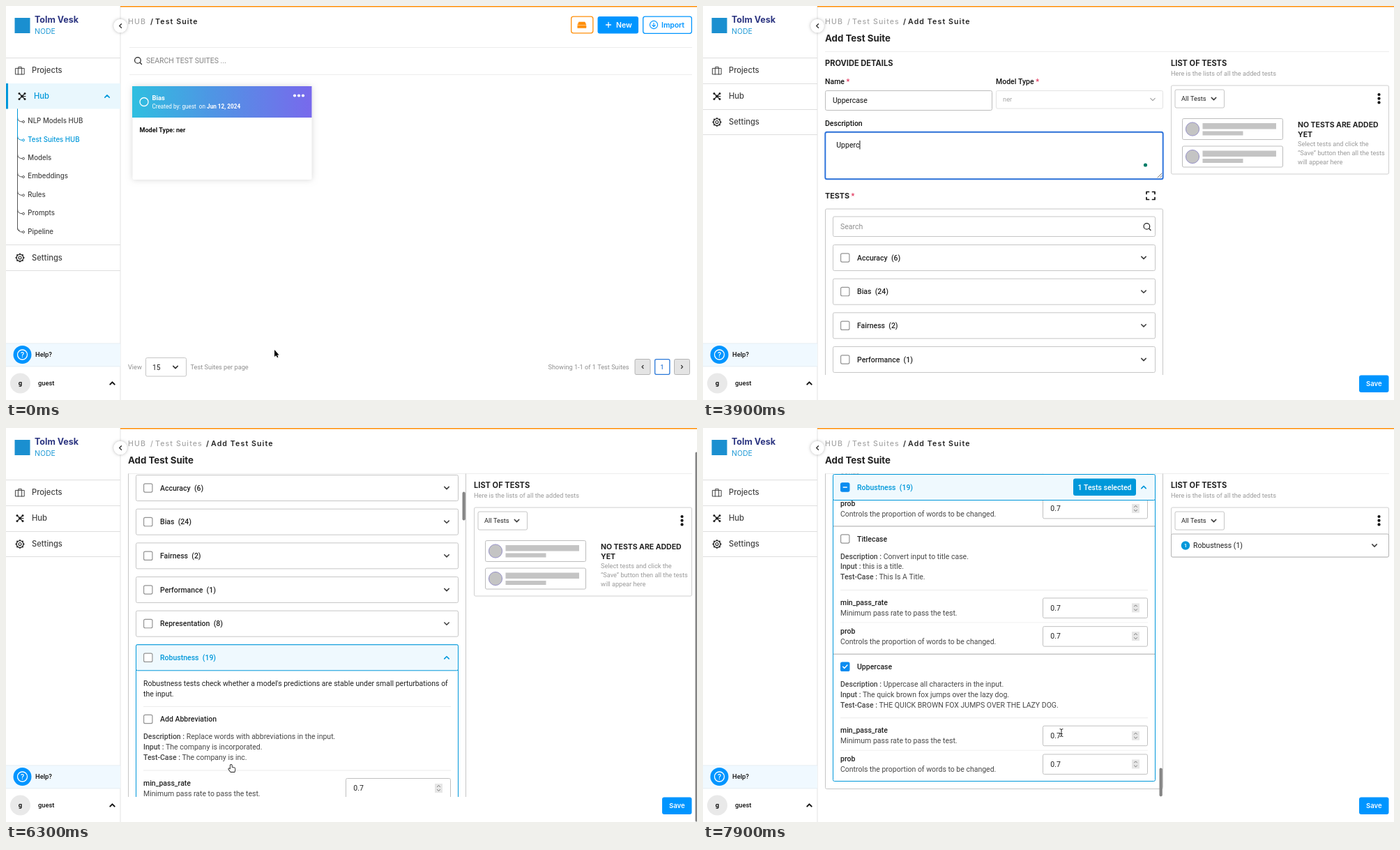
Recreate the animation shown at these times as an HTML page with a canvas. Size 991 px wide and 565 px high, loop 8 s.

```html
<!DOCTYPE html>
<html lang="en">
<head>
<meta charset="utf-8">
<title>Test suite form</title>
<style>
html, body { margin: 0; width: 100%; height: 100%; overflow: hidden; background: #fff; }
canvas { display: block; width: 991px; height: 565px; }
</style>
</head>
<body>
<canvas id="stage"></canvas>
<script>
const canvas = document.getElementById('stage');
const ratio = window.devicePixelRatio || 1;
canvas.width = 991 * ratio;
canvas.height = 565 * ratio;
const c = canvas.getContext('2d');

const LOOP = 8000, STEP = 100;
const BLUE = '#0095ff', TEAL = '#0098da', INK = '#222', GREY = '#8f8f8f', RULE = '#c6c6c6', ORANGE = '#ff8f0a';
const TOP = 66, VIEW = 463;
const WORD = 'Uppercase';

// ---------- drawing helpers ----------
function text(s, x, y, size = 10.5, color = INK, weight = 400, family = 'Roboto', align = 'left') {
  c.font = `${weight} ${size}px ${family}, sans-serif`;
  c.fillStyle = color;
  c.textAlign = align;
  c.fillText(s, x, y + size * 0.355);
  return x + c.measureText(s).width;
}
const head = (s, x, y, size = 11, color = INK, weight = 700, align) => text(s, x, y, size, color, weight, 'Inter', align);

function box(x, y, w, h, r, fill, stroke, lw = 1) {
  c.beginPath();
  c.roundRect(x + lw / 2, y + lw / 2, w - lw, h - lw, r);
  if (fill) { c.fillStyle = fill; c.fill(); }
  if (stroke) { c.strokeStyle = stroke; c.lineWidth = lw; c.stroke(); }
}
function rect(x, y, w, h, color) { c.fillStyle = color; c.fillRect(x, y, w, h); }
function dot(x, y, r, fill, stroke, lw = 1) {
  c.beginPath();
  c.arc(x, y, r, 0, 7);
  if (fill) { c.fillStyle = fill; c.fill(); }
  if (stroke) { c.strokeStyle = stroke; c.lineWidth = lw; c.stroke(); }
}
function path(d, x, y, stroke, lw = 1.2, fill) {
  c.save();
  c.translate(x, y);
  const p = new Path2D(d);
  c.lineJoin = c.lineCap = 'round';
  if (stroke) { c.strokeStyle = stroke; c.lineWidth = lw; c.stroke(p); }
  if (fill) { c.fillStyle = fill; c.fill(p); }
  c.restore();
}
const down = (x, y, color = '#444', lw = 1.6) => path('M-3.2-1.6L0 1.6L3.2-1.6', x, y, color, lw);
const up = (x, y, color, lw = 1.6) => path('M-3.2 1.6L0-1.6L3.2 1.6', x, y, color, lw);
function lens(x, y) {
  dot(x - 0.6, y - 0.6, 4.3, null, INK, 1.2);
  path('M2.6 2.6L5 5', x, y, INK, 1.3);
}
function shadow(color, blur, fn) {
  c.save();
  c.shadowColor = color;
  c.shadowBlur = blur * ratio;
  fn();
  c.restore();
}

// ---------- timing helpers ----------
function track(t, keys) {
  let i = 0;
  while (i < keys.length - 1 && keys[i + 1][0] <= t) i++;
  const a = keys[i], b = keys[i + 1];
  if (!b || t < a[0]) return a.slice(1);
  const k = (t - a[0]) / (b[0] - a[0]);
  return a.slice(1).map((v, j) => typeof v === 'number' ? v + (b[j + 1] - v) * k : v);
}
const typed = (t, times) => WORD.slice(0, times.filter(k => k <= t).length);
const within = (t, a, b) => t >= a && t < b;

// ---------- test items ----------
const NAMES = ['Add Abbreviation', 'Add Context', 'Add Contraction', 'Add Filler', 'Add Punctuation', 'Add Slang',
  'Add Typo', 'Extra Spaces', 'Homophone Swap', 'Letter Noise', 'Lowercase', 'Number To Word', 'Repeat Letters',
  'Scan Noise', 'Speech Noise', 'Strip Punctuation', 'Synonym Swap', 'Titlecase', 'Uppercase'];
const COPY = {
  'Add Abbreviation': ['Replace words with abbreviations in the input.', 'The company is incorporated.', 'The company is inc.'],
  'Titlecase': ['Convert input to title case.', 'this is a title.', 'This Is A Title.'],
  'Uppercase': ['Uppercase all characters in the input.', 'The quick brown fox jumps over the lazy dog.', 'THE QUICK BROWN FOX JUMPS OVER THE LAZY DOG.']
};
const PARAM = 40.75;
let nextTop = 674;
const items = NAMES.map((name, i) => {
  const params = COPY[name] ? 2 : 3 + (i + 1) % 2;
  const lines = COPY[name] || [`Apply ${name.toLowerCase()} to the input.`, COPY.Uppercase[1], COPY.Uppercase[1]];
  const item = { name, lines, params, top: nextTop, height: 101.8 + params * PARAM };
  nextTop += item.height;
  return item;
});
const PANEL_END = nextTop;
const ROW = 585.3;
const SHORT_MAX = 124, LONG_MAX = PANEL_END + 22 - 529;

const scrollKeys = [[0, 0], [5500, 0], [5600, 166.5], [5700, 150], [5800, 131], [5900, SHORT_MAX], [6100, SHORT_MAX],
  [6200, 185], [6300, 275], [6400, 750], [6500, 1600], [6600, 2700], [6700, 3750], [6800, 4420],
  [6900, LONG_MAX + 13.5], [7000, LONG_MAX + 7], [7100, LONG_MAX + 3], [7200, LONG_MAX + 1], [7300, LONG_MAX]];

const cursorKeys = [[0, 385, 493, 'arrow'], [100, 803, 67, 'arrow'], [200, 803, 67, 'arrow'], [300, 877, 29, 'hand'],
  [600, 877, 29, 'arrow'], [700, 780, 50, 'arrow'], [800, 560, 95, 'arrow'], [900, 390, 128, 'beam'], [1000, 334, 136, 'beam'],
  [1500, 334, 136, ''], [2600, 334, 140, 'beam'], [2900, 322, 205, 'beam'], [3200, 322, 205, ''],
  [4700, 280, 225, 'beam'], [4900, 290, 290, 'hand'], [5200, 302, 380, 'hand'], [5400, 308, 415, 'hand'],
  [5600, 308, 415, 'hand'], [5900, 324, 488, 'hand'], [6400, 324, 488, 'hand'], [6500, 324, 483, 'beam'],
  [7300, 323.5, 482, 'beam'], [7400, 255, 405, 'arrow'], [7500, 204, 343, 'hand'], [7700, 204, 343, 'hand'],
  [7800, 390, 400, 'arrow'], [7900, 514, 437, 'beam']];

// ---------- sidebar ----------
function gear(x, y) {
  dot(x, y, 4.9, null, INK, 1.2);
  dot(x, y, 2, null, INK, 1.1);
  for (let i = 0; i < 8; i++) {
    const a = i * Math.PI / 4;
    dot(x + 5.6 * Math.cos(a), y + 5.6 * Math.sin(a), 1, INK);
  }
}
function nodes(x, y) {
  path('M-4-4L4 4M4-4L-4 4M0 0L5 0', x, y, INK, 1.1);
  for (const [a, b] of [[-4, -4], [4, -4], [-4, 4], [4, 4]]) dot(x + a, y + b, 1.5, INK);
  dot(x, y, 2, INK);
}
const menu = (s, x, y, color = '#444') => head(s, x, y, 11.2, color, 500);

function sidebar(open) {
  rect(163.5, 0, 1, 565, '#e4e4e4');
  rect(12.5, 17, 22, 22, '#1a8fd0');
  head('Tolm Vesk', 41, 20, 12.5, '#2b3480');
  head('NODE', 41, 36, 10.5, '#1f9ad6', 400);

  const line = y => rect(0, y, 164, 1, '#dedede');
  line(74); line(111);
  path('M-6.2-3.6h12.4v8.6h-12.4zM-2.2-3.6v-2h4.4v2M-2.6-3.6v8.6M2.6-3.6v8.6', 20, 93, '#444', 1);
  menu('Projects', 37, 92.5);
  if (open) {
    rect(0, 111, 164, 36.5, '#e9f7fd');
    rect(0, 111, 3, 36.5, TEAL);
    nodes(23, 129.5);
    menu('Hub', 40, 129.5, TEAL);
    up(145, 129.5, TEAL);
    path('M0 0V171q0 3 3 3', 16.5, 148, '#555', 1);
    ['NLP Models HUB', 'Test Suites HUB', 'Models', 'Embeddings', 'Rules', 'Prompts', 'Pipeline'].forEach((s, i) => {
      const y = 165 + i * 26.35, color = i === 1 ? TEAL : '#555';
      path('M0-6q0 6 6.5 6', 16.5, y + 1, color, 1);
      dot(25, y + 1, 1.5, '#fff', color, 1);
      head(s, 31.3, y, 9.7, i === 1 ? TEAL : '#444', 500);
    });
    path('M0 0V40', 16.5, 148, TEAL, 1);
    line(342); line(379);
    gear(20, 361);
    menu('Settings', 37, 361);
  } else {
    nodes(20, 129.5);
    menu('Hub', 37, 129.5);
    line(148); line(184);
    gear(20, 166.5);
    menu('Settings', 37, 166.5);
  }
  rect(0, 484, 164, 33, '#f0f9ff');
  rect(0, 483.5, 164, 0.8, '#e2eaf0');
  rect(0, 516.5, 164, 0.8, '#e2eaf0');
  dot(23.5, 500, 13, BLUE);
  dot(23.5, 500, 7, null, '#fff', 1.3);
  text('?', 23.5, 500, 10.5, '#fff', 500, 'Roboto', 'center');
  text('Help?', 42, 500, 9.4, '#111', 500);
  dot(20.5, 541, 14.5, '#e9e9e9');
  text('g', 20.5, 541, 9.4, '#111', 700, 'Roboto', 'center');
  text('guest', 46, 541, 9.3, '#111', 500);
  up(152.5, 541, '#111', 2);

  rect(164, 0, 827, 1.5, ORANGE);
  shadow('rgba(0,0,0,.28)', 4, () => dot(164, 28.5, 9.8, '#fff'));
  path('M1.5-2.8L-1.3 0L1.5 2.8', 164, 28.5, '#333', 1.4);
}
function crumbs(parts) {
  c.letterSpacing = '1.1px';
  parts.forEach(([s, x], i) => {
    const style = i === parts.length - 1 ? [10.6, INK, 600] : [10.6, '#a6a6a6', 500];
    if (i) head('/', x - 7, 22, ...style);
    head(s, x, 22, ...style);
  });
  c.letterSpacing = '0px';
}

// ---------- list page ----------
function listPage() {
  crumbs([['HUB', 175], ['Test Suite', 214]]);
  box(810, 14.5, 32.5, 25, 3, '#fff', ORANGE, 1.3);
  path('M-4.2-4h8.4l1.8 4h-12zM-6 1h12v3.4h-12z', 826, 27, ORANGE, 0.6, ORANGE);
  box(848, 14.5, 59.5, 25.5, 3, BLUE);
  path('M-3.5 0h7M0-3.5v7', 864, 27, '#fff', 1.3);
  head('New', 875, 27, 10.4, '#fff', 600);
  box(913, 14.5, 71, 25.5, 3, '#fff', BLUE, 1.3);
  dot(929, 27, 5.6, null, BLUE, 1.1);
  path('M0-2.8V2.4M-2.2.4L0 2.6L2.2.4', 929, 27, BLUE, 1.1);
  head('Import', 940, 27, 10.4, BLUE, 600);

  rect(177, 59, 807, 1, '#ededed');
  rect(177, 98, 807, 1, '#ededed');
  lens(189.5, 78.5);
  text('SEARCH TEST SUITES ...', 201, 78.5, 10.5, '#858585');

  shadow('rgba(0,0,0,.16)', 8, () => box(181, 115, 258, 134.5, 2, '#fff'));
  const g = c.createLinearGradient(181, 0, 438, 0);
  g.addColorStop(0, '#2fbfe0');
  g.addColorStop(0.45, '#4f95e4');
  g.addColorStop(1, '#7869ec');
  rect(181, 115, 257.5, 45, g);
  dot(198, 137.5, 6, null, '#fff', 1.3);
  text('Bias', 209.5, 132, 9.4, '#fff', 700);
  const x = text('Created by: guest  on ', 209.5, 144, 8.2, '#fff');
  text('Jun 12, 2024', x, 144, 8.2, '#fff', 700);
  for (let i = 0; i < 3; i++) dot(414 + i * 6, 128.5, 2.1, '#fff');
  text('Model Type: ner', 191.5, 177.5, 9.1, '#111', 700);

  text('View', 175, 518, 9.2, GREY);
  box(200, 504, 59, 27.5, 2, '#fff', RULE);
  text('15', 210, 518, 10.2, INK);
  down(243, 518, '#333');
  text('Test Suites per page', 264.5, 518, 9.2, GREY);
  text('Showing 1-1 of 1 Test Suites', 777.5, 518, 9.2, GREY);
  box(901.5, 506, 23, 23, 2, '#e4e4e4', '#b4b4b4');
  box(930, 506, 22.5, 23, 2, '#fff', '#2a78d8', 1.3);
  box(958, 506, 23, 23, 2, '#e4e4e4', '#b4b4b4');
  path('M1-2L-1 0L1 2', 913, 517.5, '#333', 1.2);
  path('M-1-2L1 0L-1 2', 969.5, 517.5, '#333', 1.2);
  text('1', 941, 518, 8.6, '#2a78d8', 500, 'Roboto', 'center');
}

// ---------- form page ----------
function check(x, y, state) {
  box(x, y, 13.5, 13.5, 2, state ? '#0a8cf0' : '#fff', state ? '#0a8cf0' : '#949494', 1.2);
  if (state === 'some') path('M-2.5 0h5', x + 6.75, y + 6.75, '#fff', 1.5);
  if (state === 'on') path('M-3 0L-1 2.3L3.2-2.3', x + 6.75, y + 6.75, '#fff', 1.5);
}
const star = (x, y) => text('*', x + 2.5, y, 11, '#e0335a', 500);
const label = (s, x, y) => text(s, x, y, 10.5, '#111', 500);
function field(x, y, w, h, focused) {
  box(x, y, w, h, 2, '#fff', '#bcbcbc');
  if (focused) box(x - 0.7, y - 0.7, w + 1.4, h + 1.4, 2.5, null, '#2f74dc', 2);
}
function caret(s, x, y) {
  c.font = '400 10.5px Roboto, sans-serif';
  rect(x + c.measureText(s).width, y - 6, 1, 12.5, '#111');
}
function row(s, y) {
  box(186, y, 463, 38, 2, '#fff', RULE);
  check(197, y + 12.2);
  text(s, 221, y + 19, 10.5, INK, 500);
  down(632, y + 19);
}
function itemBlock(it, first, on) {
  const y = it.top;
  rect(first ? 197 : 187, y, first ? 441 : 461, 1, first ? '#ececec' : '#a8a8a8');
  check(197, y + 11.8, on && 'on');
  text(it.name, 221, y + 18.5, 10.5, INK, 500);
  ['Description : ', 'Input : ', 'Test-Case : '].forEach((s, i) => {
    const ly = y + 43.5 + i * 14.8;
    text(it.lines[i], text(s, 197, ly, 10.5, '#444', 500), ly, 10.5, '#484848');
  });
  rect(197, y + 91.5, 441, 1, '#ececec');
  for (let i = 0; i < it.params; i++) {
    const py = y + 110 + i * PARAM;
    // the last parameter is always the proportion
    const name = !i ? 'min_pass_rate' : i === it.params - 1 ? 'prob' : 'count';
    text(name, 197, py, 10.5, INK, 500);
    text(i ? 'Controls the proportion of words to be changed.' : 'Minimum pass rate to pass the test.', 197, py + 15, 10.5, '#484848');
    box(487, py - 7, 151, 29.5, 2, '#fff', '#c0c0c0');
    text('0.7', 498.3, py + 7.5, 10.5, INK);
    rect(615, py + 1, 11, 13, '#e6e6e6');
    path('M-2-2L0-4L2-2M-2 2L0 4L2 2', 620.5, py + 7.5, '#666', 0.9);
    if (i < it.params - 1) rect(197, py + 28, 441, 1, '#f0f0f0');
  }
}
function details(t) {
  head('PROVIDE DETAILS', 175, 82.5, 11.1);
  star(label('Name', 175, 108), 108);
  const name = typed(t, [1500, 1700, 1800, 1900, 2000, 2100, 2300, 2400, 2500]);
  const inName = within(t, 1300, 2900);
  field(175, 121, 240, 29, inName);
  text(name || 'Name', 186, 135.5, 10.5, name ? '#111' : GREY);
  if (inName) caret(name, 186, 135.5);
  star(label('Model Type', 420, 108), 108);
  box(420, 121, 240, 26.5, 2, '#fff', '#e2e2e2');
  text('ner', 430, 134, 9.3, '#a6a6a6');
  down(645, 134, '#a6a6a6', 1.3);

  label('Description', 175, 168);
  const desc = typed(t, [3200, 3300, 3400, 3500, 3700, 3900, 4000, 4100, 4200]);
  const inDesc = t >= 2900;
  field(175, 180.5, 485, 68, inDesc);
  text(desc || 'Write description...', 191.3, 199, 10.5, desc ? '#111' : GREY);
  if (inDesc && (t < 4400 || Math.floor((t - 4400) / 500) % 2)) caret(desc, 191.3, 199);
  path('M0 0L6-6M3.5 0L6-2.5', 652, 246, '#666', 0.9);
  if (within(t, 3000, 3300)) {
    dot(631, 225, 9.5, '#e3f1ee');
    dot(631, 225, 7.3, '#067d68');
  } else if (within(t, 3300, 5600)) dot(634.5, 228, 2.6, '#067d68');
}
function tests(open, picked, scroll) {
  star(head('TESTS', 175, 272, 10.8), 272);
  path('M-6-2.5V-5.5H-2.5M2.5-5.5H6V-2.5M6 2.5V5.5H2.5M-2.5 5.5H-6V2.5', 642, 272, '#111', 1.7);
  const end = open ? PANEL_END : ROW + 38;
  box(175, 290.5, 485, end + 11 - 290.5, 2, null, RULE);
  box(186, 301.5, 463, 29.5, 2, '#fff', RULE);
  text('Search', 197, 316.5, 10.5, GREY);
  lens(637, 316.5);
  ['Accuracy  (6)', 'Bias  (24)', 'Fairness  (2)', 'Performance  (1)', 'Representation  (8)']
    .forEach((s, i) => row(s, 342 + i * 48.66));
  if (!open) return row('Robustness  (19)', ROW);

  text("Robustness tests check whether a model's predictions are stable under small perturbations of", 197, 641, 10.5, INK);
  text('the input.', 197, 656, 10.5, INK);
  items.forEach((it, i) => {
    const y = it.top - scroll;
    if (y < 540 && y + it.height > 50) itemBlock(it, !i, picked && it.name === 'Uppercase');
  });
  box(186, ROW, 463, PANEL_END - ROW, 2, null, TEAL);
  const y = Math.max(ROW, TOP + scroll);
  rect(186, TOP + scroll - 1, 463, y === ROW ? 0 : 3, '#fff');
  box(186, y, 463, 38, 2, '#eff9fe', TEAL);
  check(197, y + 12.2, picked && 'some');
  text('Robustness  (19)', 221, y + 19, 10.5, TEAL, 500);
  up(632, y + 19, TEAL);
  if (picked) {
    box(530.5, y + 6, 91, 25.5, 3, TEAL);
    text('1 Tests selected', 576, y + 19, 10.5, '#fff', 500, 'Roboto', 'center');
  }
}
function rightPanel(picked) {
  head('LIST OF TESTS', 671, 82.5, 11.1);
  text('Here is the lists of all the added tests', 671, 96.5, 9.2, '#9a9a9a');
  box(671, 113.5, 313, picked ? 72 : 128, 2, '#fff', '#cfcfcf');
  box(676.5, 119.5, 71.5, 27, 2, '#fff', RULE);
  text('All Tests', 686, 133, 9.3, INK);
  down(732.5, 133);
  for (let i = 0; i < 3; i++) dot(969.5, 127 + i * 5.7, 2.1, '#111');
  if (picked) {
    box(671, 151.5, 313, 34, 2, '#fff', '#b4b4b4');
    dot(692, 168.5, 6.2, TEAL);
    text('1', 692, 168.5, 8, '#fff', 500, 'Roboto', 'center');
    text('Robustness (1)', 703, 168.5, 10.5, INK);
    down(963, 168.5);
    return;
  }
  for (const y of [161, 200.5]) {
    box(687, y, 145, 31, 2, '#fff', '#bdbdbd');
    dot(702, y + 15.5, 9.6, '#c4c4c4', '#8e88c4', 0.9);
    rect(716.5, y + 7, 105.5, 8.5, '#c4c4c4');
    rect(716.5, y + 18.5, 58, 6, '#c4c4c4');
  }
  head('NO TESTS ARE ADDED', 853, 170, 10.5);
  head('YET', 853, 184, 10.5);
  ['Select tests and click the', '“Save” button then all the tests', 'will appear here']
    .forEach((s, i) => text(s, 853, 198 + i * 12.8, 9.2, '#9a9a9a'));
}
function thumb(scroll, open) {
  const max = open ? LONG_MAX : SHORT_MAX, total = max + VIEW;
  const over = Math.max(0, scroll - max);
  const len = Math.max(40, VIEW * VIEW / total - over);
  const y = over ? TOP + VIEW - len : TOP + scroll / total * VIEW;
  box(654, y, 5.3, len, 2.6, '#858585');
}
function formPage(t) {
  const open = t >= 6000, picked = t >= 7600;
  const [scroll] = track(t, scrollKeys);
  crumbs([['HUB', 175], ['Test Suites', 214], ['Add Test Suite', 294]]);
  head('Add Test Suite', 175, 46.5, 13.3);
  rect(175, 65, 809, 1, '#ededed');

  c.save();
  c.beginPath();
  c.rect(170, 65.5, 495, 463.5);
  c.clip();
  c.translate(0, -scroll);
  details(t);
  tests(open, picked, scroll);
  c.restore();
  if (within(t, 5600, 5700)) dot(634.5, 110.5, 2.6, '#067d68');
  if (within(t, 600, 1300) || t >= 5600) thumb(scroll, open);
  if (within(t, 600, 1300) || within(t, 6000, 6600)) box(988, 34, 4, 531, 2, '#858585');

  rightPanel(picked);
  const ready = t >= 1700;
  box(940.5, 529, 43.5, 25.5, 3, ready ? BLUE : '#f0f0f0');
  head('Save', 962.3, 542, 9.5, ready ? '#fff' : '#c2c2c2', ready ? 600 : 500, 'center');
}

// ---------- pointer ----------
const ARROW = 'M0 0V10L2.3 8L4 11.3L5.4 10.6L3.9 7.4H6.6Z';
const HAND = 'M-2.2-4.4q1-1.2 2 0V-1.2L3.6-.5q1 .3 .9 1.6L3.7 5H-1.8L-4.6 1.2q-.2-1.2 1-.8L-2.2 1.4Z';
const BEAM = 'M-2-5.5Q0-5.5 0-4Q0-5.5 2-5.5M0-4V4M-2 5.5Q0 5.5 0 4Q0 5.5 2 5.5M-1.2 1.5H1.2';
function pointer(t) {
  const [x, y, kind] = track(t, cursorKeys);
  if (kind === 'arrow') path(ARROW, x, y, '#fff', 1.6, '#000');
  if (kind === 'hand') path(HAND, x, y, '#222', 1.8, '#fff');
  if (kind === 'beam') path(BEAM, x, y, '#222', 1);
}

function draw(elapsed) {
  const t = Math.floor(elapsed % LOOP / STEP) * STEP;
  const onList = t < 600;
  c.setTransform(ratio, 0, 0, ratio, 0, 0);
  rect(0, 0, 991, 565, '#fff');
  sidebar(onList);
  if (onList) listPage(); else formPage(t);
  pointer(t);
}

const start = performance.now();
function tick() {
  draw(performance.now() - start);
  requestAnimationFrame(tick);
}
tick();
</script>
</body>
</html>
```
